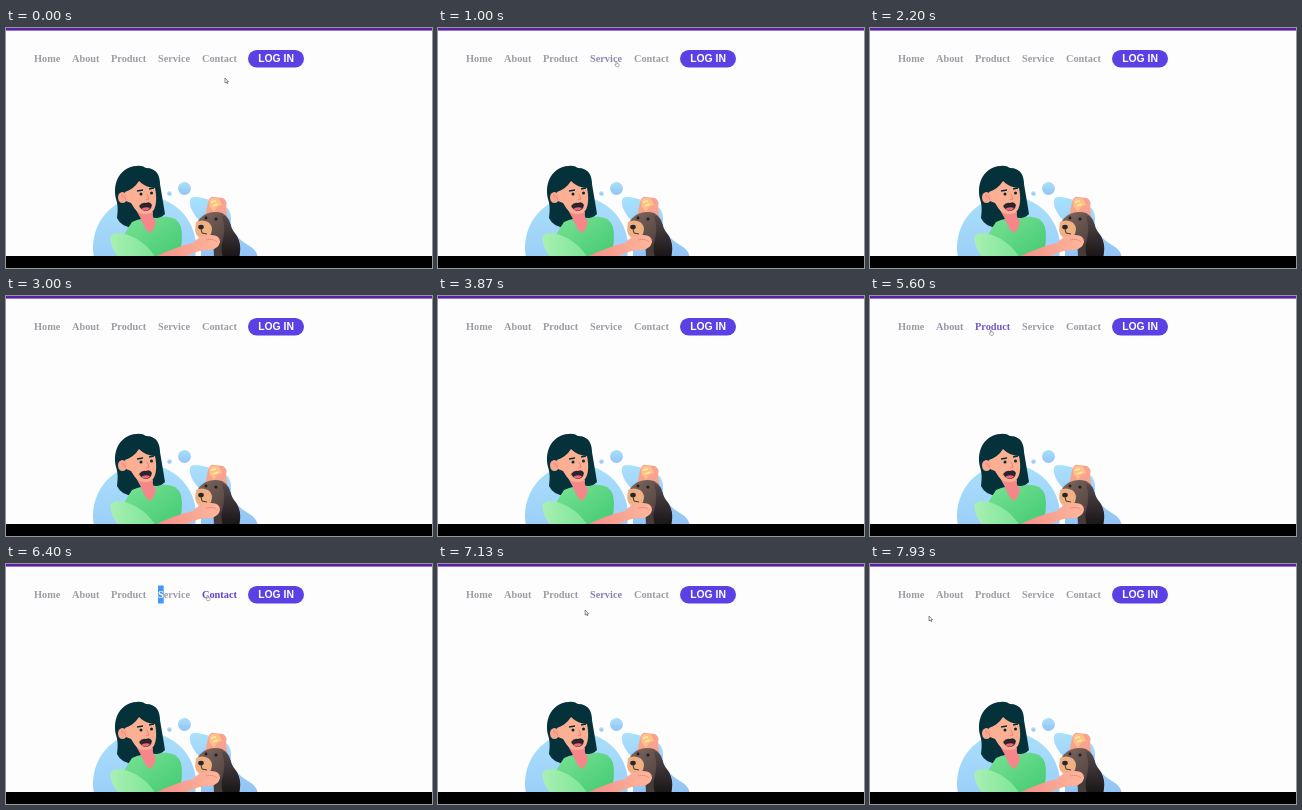
Animation of 426x240 px, one loop 8000 ms. Source, as an HTML page:

```html
<!DOCTYPE html>
<html lang="en">
<head>
<meta charset="utf-8">
<title>Pet care landing page</title>
<style>
  html, body { margin: 0; width: 100%; height: 100%; overflow: hidden; background: #fdfdfe; }
  svg { display: block; width: 100vw; height: 100vh; }
  .nav { font: bold 10.3px "Liberation Serif", "Times New Roman", serif; }
  .button { font: bold 10.4px "Liberation Sans", Arial, sans-serif; fill: #fff; }
</style>
</head>
<body>
<svg viewBox="0 0 426 240">
  <defs>
    <linearGradient id="sky" x1="0" y1="0" x2="0" y2="1">
      <stop stop-color="#a9e0fb"/><stop offset="1" stop-color="#93c3f5"/>
    </linearGradient>
    <linearGradient id="shirt" x1="0" y1="0" x2="1" y2="1">
      <stop stop-color="#78e292"/><stop offset="1" stop-color="#42c973"/>
    </linearGradient>
    <linearGradient id="sleeve" x1="0" y1="0" x2="1" y2="0">
      <stop stop-color="#a8f0b4"/><stop offset="1" stop-color="#7ce495"/>
    </linearGradient>
    <linearGradient id="skin" x1="0" y1="0" x2="1" y2="0">
      <stop stop-color="#f58d86"/><stop offset="1" stop-color="#fdb79b"/>
    </linearGradient>
    <linearGradient id="fur" x1="0" y1="0" x2="1" y2="1">
      <stop stop-color="#80685f"/><stop offset="1" stop-color="#4c3f3d"/>
    </linearGradient>
    <linearGradient id="ear" x1="0" y1="0" x2="0" y2="1">
      <stop stop-color="#55494a"/><stop offset="1" stop-color="#171316"/>
    </linearGradient>
  </defs>
  <rect width="426" height="240" fill="#fdfdfe"/>
  <rect width="426" height="2.6" fill="#5b22a0"/>

  <g id="backdrop" fill="url(#sky)">
    <circle cx="138.500" cy="219.500" r="51.500"/>
    <path d="M185 170C191 167 200 171 208 173C219 175 226 182 225 193C224 204 234 212 242 217Q251 222 252 230H195V194C188 188 181 176 185 170Z"/>
    <circle cx="178.500" cy="160.500" r="6.500"/>
    <circle cx="163.500" cy="165.500" r="2.200"/>
  </g>

  <g id="raised-hand">
    <path d="M199 189L202 174Q204 168 208 169L217 170Q222 173 220 179L221 188Z" fill="#f8a38f"/>
    <path d="M203 172Q208 168 213 171L216 177L211 179L208 184L204 179Z" fill="#ffc184"/>
    <path d="M205 174L210 173M207 178L212 176" stroke="#fff0b9" stroke-width="1.300"/>
  </g>

  <g id="woman">
    <path d="M130 138Q136 137 140 140C151 140 154 148 154 156C156 168 158 179 159 186Q154 191 149 191Q140 200 128 200Q115 199 111 190C112 182 112 177 110 171C106 154 115 139 130 138Z" fill="#05323a"/>
    <path d="M126 194Q138 189 151 190Q170 185 175 199Q178 213 172 230H125L119 205Z" fill="url(#shirt)"/>
    <path d="M130 182L147 184Q146 190 150 193Q149 201 144 205Q138 201 135 191Z" fill="#f5878a"/>
    <path d="M119 164Q128 161 133 153Q140 160 149 160C151 169 151 181 145 185Q138 187 133 185Q128 181 125 175L120 173Z" fill="#fbb093"/>
    <ellipse cx="116.500" cy="169.500" rx="4.500" ry="5.500" fill="#faa78f"/>
    <path d="M115 168Q119 167 120 172" fill="none" stroke="#f28582"/>
    <path d="M131 163L137 162M143 161L148 160" fill="none" stroke="#05323a" stroke-width="1.300"/>
    <circle cx="135" cy="166" r="1.500" fill="#08282f"/>
    <circle cx="145.500" cy="165" r="1.500" fill="#08282f"/>
    <path d="M141 166L143 171L140 172" fill="none" stroke="#ee8178"/>
    <path d="M133 178Q136 174 140 175Q144 173 146 177Q145 183 139 183Q135 182 133 178Z" fill="#2c2530"/>
    <path d="M135 181Q139 178 144 180Q141 185 135 181Z" fill="#f2657f"/>
  </g>

  <g id="dog">
    <path d="M207 204Q226 202 234 230H208Z" fill="#463b3b"/>
    <path d="M191 195C195 186 206 182 216 185Q226 190 225 204L216 215Q204 212 193 209Q188 204 191 195Z" fill="url(#fur)"/>
    <path d="M190 194Q196 191 202 194Q208 198 205 206L199 212Q190 210 189 202Z" fill="#efb184"/>
    <ellipse cx="195" cy="199" rx="2.800" ry="2.300" fill="#29272c"/>
    <path d="M195 201L196 205L201 206" fill="none" stroke="#4d3430"/>
    <circle cx="200" cy="190" r="1.400" fill="#201f25"/>
    <circle cx="210" cy="191" r="1.600" fill="#201f25"/>
    <path d="M216 188C223 187 224 198 228 204Q237 214 233 230H217Q214 220 217 211Q220 200 216 188Z" fill="url(#ear)"/>
  </g>

  <g id="arms">
    <path d="M146 230Q172 218 187 215Q195 206 205 207Q214 207 214 214Q213 220 205 222Q192 222 183 227L176 230Z" fill="url(#skin)"/>
    <path d="M200 212Q207 210 211 214" fill="none" stroke="#ee8e83"/>
    <path d="M104 209Q110 203 119 206Q139 212 150 230H113Q105 221 104 209Z" fill="url(#sleeve)"/>
  </g>
  <rect y="228" width="426" height="12"/>

  <rect id="selection" x="152" y="21.500" width="5.700" height="18" fill="#4297fb"/>
  <g id="links" class="nav"></g>
  <text id="selected" class="nav" x="152" y="34" fill="#fff">S</text>
  <rect x="242" y="22" width="56" height="17.500" rx="8.750" fill="#5b40e4"/>
  <text class="button" x="252.200" y="34.300">LOG IN</text>

  <path id="arrow" d="M0 0V5L1.200 4L2 5.600L2.800 5.200L2 3.800H3.500Z" fill="#fff" stroke="#444" stroke-width=".6"/>
  <path id="hand" d="M0 0Q.9 -.6 1 .4V1.900L3 2.500V4.100L2.300 5.300H.2L-1.200 3.300L-.6 2.700L0 3.300Z" fill="#fff" stroke="#777" stroke-width=".6"/>
</svg>
<script>
const LOOP = 8000, FADE = 300;
const get = id => document.getElementById(id);
const links = [
  ["Home", 28, 54], ["About", 66, 94], ["Product", 105, 140],
  ["Service", 152, 184], ["Contact", 196, 231]
].map(([label, left, right]) => {
  const node = document.createElementNS("http://www.w3.org/2000/svg", "text");
  node.textContent = label;
  node.setAttribute("x", left);
  node.setAttribute("y", 34);
  get("links").append(node);
  return { node, left, right };
});

// Pointer stops: time, x, y.
const path = [
  [0, 219, 50], [350, 217, 48], [930, 187, 43], [1000, 178, 33.5],
  [1400, 122, 35], [1800, 42, 37], [2150, -10, 48], [4000, -10, 44],
  [4350, 38, 36], [4730, 46.5, 32.5], [5100, 60, 34], [5500, 115, 34],
  [5950, 158, 34], [6150, 197, 33], [6400, 201, 31.5], [6750, 195, 36],
  [7100, 148, 46], [7600, 70, 52], [7930, 59, 52], [8000, 59, 52]
];

function pointerAt(time) {
  const i = Math.max(1, path.findIndex(stop => stop[0] >= time));
  const [t0, x0, y0] = path[i - 1], [t1, x1, y1] = path[i];
  const p = Math.max(0, (time - t0) / (t1 - t0));
  const ease = p * p * (3 - 2 * p);
  return { x: x0 + (x1 - x0) * ease, y: y0 + (y1 - y0) * ease };
}

const isOver = (link, { x, y }) => x >= link.left && x <= link.right && y > 22 && y < 41;

function hoverAmount(link, time) {
  const samples = 10;
  let hits = 0;
  for (let i = 0; i < samples; i++) {
    hits += isOver(link, pointerAt(Math.max(0, time - i * FADE / samples)));
  }
  return hits / samples;
}

function show(id, visible) {
  get(id).style.display = visible ? "" : "none";
}

function draw(now) {
  const time = now % LOOP;
  const pointer = pointerAt(time);
  for (const link of links) {
    const amount = hoverAmount(link, time);
    const mix = (from, to) => Math.round(from + (to - from) * amount);
    link.node.setAttribute("fill", `rgb(${mix(158, 98)},${mix(156, 62)},${mix(162, 212)})`);
  }
  const overLink = links.some(link => isOver(link, pointer));
  const selecting = time >= 6000 && time < 7000;
  show("selection", selecting);
  show("selected", selecting);
  show("arrow", !overLink);
  show("hand", overLink);
  for (const id of ["arrow", "hand"]) {
    get(id).setAttribute("transform", `translate(${pointer.x} ${pointer.y})`);
  }
  requestAnimationFrame(draw);
}
requestAnimationFrame(draw);
</script>
</body>
</html>
```
